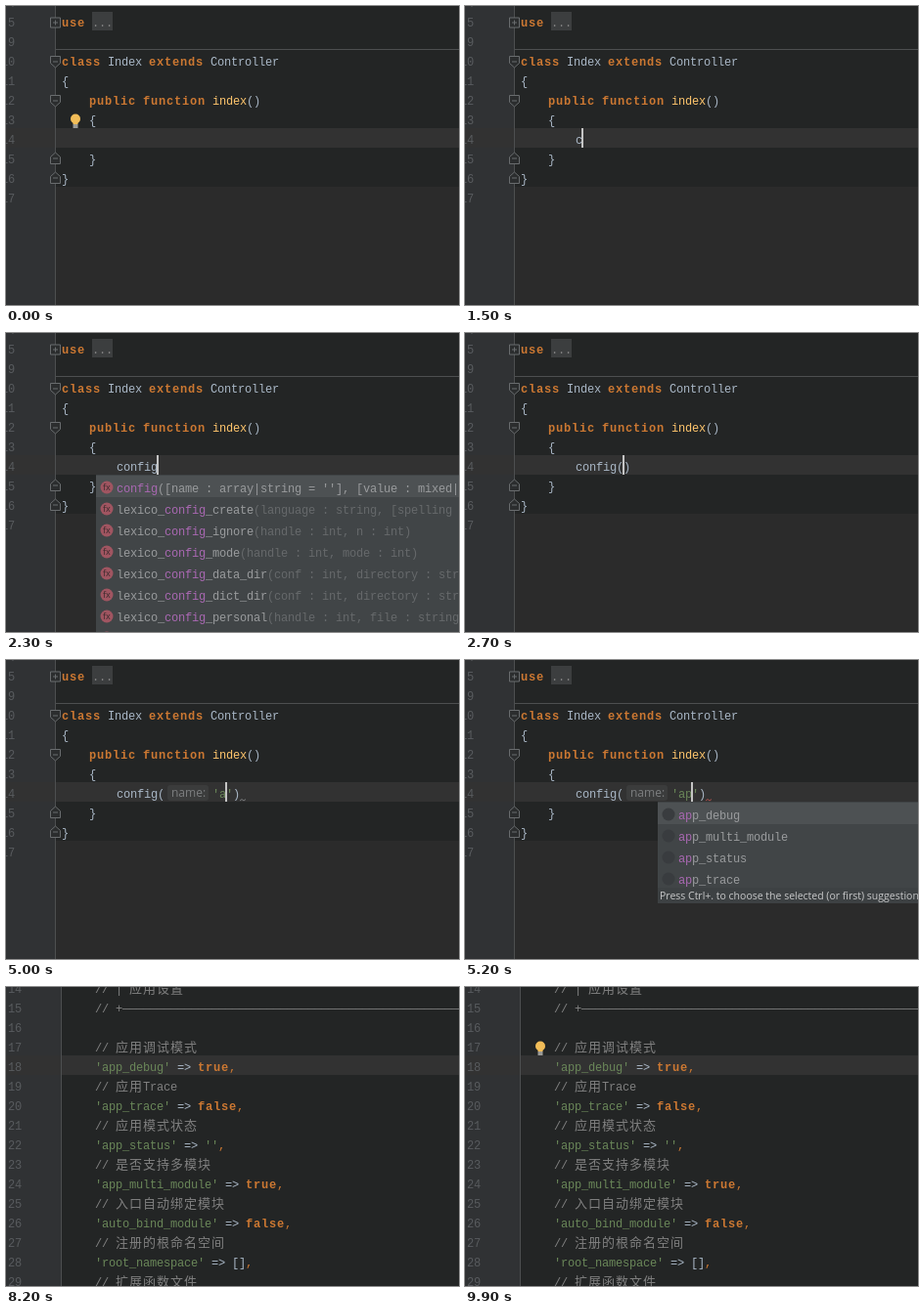
An HTML page with a canvas that plays this animation: 463 by 306 pixels, repeating every 10 s.

```html
<!DOCTYPE html>
<html lang="en">
<head>
<meta charset="utf-8">
<title>Editor autocomplete</title>
<style>
html, body { margin: 0; width: 100%; height: 100%; overflow: hidden; background: #2b2b2b; }
canvas { display: block; }
</style>
</head>
<body>
<canvas id="stage" width="463" height="306"></canvas>
<script>
const c = document.getElementById('stage').getContext('2d');
const W = 463, H = 306, LOOP = 10000;

const MONO = '12px "Liberation Mono", "DejaVu Sans Mono", monospace';
const CJK = '13px "Noto Sans CJK SC", "Noto Sans CJK", sans-serif';
const UI = '"Open Sans", "Noto Sans", sans-serif';
const PLAIN = '#a9b7c6', ORANGE = '#cc7832', GREEN = '#6a8759', GREY = '#808080';

// style: colour, font, advance per character, letter spacing
const mono = color => [color, MONO, 7, '-0.2px'];
const STYLES = {
  t: mono(PLAIN), f: mono('#ffc66d'), s: mono(GREEN), o: mono(ORANGE), g: mono(GREY),
  n: mono('#585b5e'), p: mono('#a968b2'), l: mono('#999b9d'), d: mono('#66696b'),
  k: [ORANGE, 'bold ' + MONO, 8, '0.8px'],
  z: [GREY, CJK, 14, '1px']
};

function rect(x, y, w, h, color) {
  c.fillStyle = color;
  c.fillRect(x, y, w, h);
}

function disc(x, y, r, color) {
  c.fillStyle = color;
  c.beginPath();
  c.arc(x, y, r, 0, 7);
  c.fill();
}

// Writes [style, text] runs on the character grid and returns the end x.
function write(x, y, ...runs) {
  for (const [style, text] of runs) {
    const [color, font, step, spacing] = STYLES[style];
    c.fillStyle = color;
    c.font = font;
    c.letterSpacing = spacing;
    c.fillText(text, x, y);
    x += text.length * step;
  }
  return x;
}

function label(text, x, y, size, color) {
  c.letterSpacing = '0px';
  c.font = size + 'px ' + UI;
  c.fillStyle = color;
  c.fillText(text, x, y);
}

function lineNumber(n, right, y) {
  write(right - 7 * String(n).length, y, ['n', String(n)]);
}

function bulb(x, y) {
  disc(x, y + 5.5, 5, '#f2bd58');
  rect(x - 2.5, y + 9, 5, 2, '#f2bd58');
  rect(x - 2.5, y + 11, 5, 4, '#9a9a96');
}

function caret(x, y) {
  rect(x - 1, y, 2, 20, '#c4c4c4');
}

function squiggle(x, color) {
  c.strokeStyle = color;
  c.beginPath();
  c.moveTo(x, 144);
  for (let i = 1; i < 4; i++) c.lineTo(x + 2 * i, i % 2 ? 142.5 : 144);
  c.stroke();
}

// Fold marker: dir 1 opens a block, -1 closes it, 0 is collapsed.
function fold(y, dir) {
  c.strokeStyle = '#696c6e';
  c.fillStyle = '#2b2d2e';
  c.beginPath();
  if (dir) {
    const a = y - 5.5 * dir, b = y + 1.5 * dir;
    c.moveTo(45.5, a);
    c.lineTo(55.5, a);
    c.lineTo(55.5, b);
    c.lineTo(50.5, y + 6 * dir);
    c.lineTo(45.5, b);
    c.closePath();
  } else c.rect(45.5, y - 5, 10, 10);
  c.fill();
  c.moveTo(48, y);
  c.lineTo(53, y);
  if (!dir) {
    c.moveTo(50.5, y - 2.5);
    c.lineTo(50.5, y + 2.5);
  }
  c.stroke();
}

function gutter(width, rowY) {
  rect(0, 0, width, H, '#303234');
  rect(0, rowY, W, 20, '#323232');
  rect(width, 0, 1, H, '#4d4f50');
}

function popup(x, rows, match, icon) {
  const top = 146, end = top + 22 * rows.length;
  rect(x, top - 1, W - x, end + 16 - top, '#414547');
  rect(x, top, W - x, 22, '#4d5153');
  rows.forEach(([name, args = ''], i) => {
    const y = 158 + 22 * i, at = name.indexOf(match), stop = at + match.length;
    icon(x + 11, y);
    write(x + 21, y + 5, ['l', name.slice(0, at)], ['p', match],
      ['l', name.slice(stop)], [i ? 'd' : 'l', args]);
  });
  rect(x, end - 1, W - x, 16, '#3d4143');
  label('Press Ctrl+. to choose the selected (or first) suggestion and insert a dot afterwards',
    x + 2, end + 11, 10.5, '#c8c9ca');
}

function functionIcon(x, y) {
  disc(x, y, 6.5, '#a05561');
  label('fx', x - 4, y + 3, 9, '#3a2a2d');
}

const keyIcon = (x, y) => disc(x, y, 6.5, '#393c3f');

const FUNCTIONS = [
  ['config', "([name : array|string = ''], [value : mixed|null"],
  ['confirm_sql_row_compiled', '()'],
  ['lexico_config_create', '(language : string, [spelling : string'],
  ['lexico_config_ignore', '(handle : int, n : int)'],
  ['lexico_config_mode', '(handle : int, mode : int)'],
  ['lexico_config_data_dir', '(conf : int, directory : string)'],
  ['lexico_config_dict_dir', '(conf : int, directory : string)'],
  ['lexico_config_personal', '(handle : int, file : string)'],
  ['lexico_config_repl', '(handle : int, file : string)']
];
const KEYS = ['app_debug', 'app_multi_module', 'app_status', 'app_trace', 'auto_bind_module',
  'action_suffix', 'auto_search', 'auto_start'].map(k => [k]);

const CALL = [[0, ''], [1500, 'c'], [1700, 'con'], [1900, 'conf'], [2100, 'confi'], [2300, 'config']];
const KEY = [[3600, ''], [4900, 'a'], [5200, 'ap'], [5800, 'app_debug']];
const latest = (steps, t) => steps.filter(s => s[0] <= t).pop()[1];
const within = (t, a, b) => t >= a && t < b;

function controller(t) {
  rect(0, 0, W, H, '#2b2b2b');
  rect(51, 0, W, 185, '#232525');
  gutter(50, 125);
  rect(51, 44, W, 1, '#4d4f50');
  [4, 5, 9, 10, 11, 12, 13, 14, 15, 16, 17].forEach((n, i) => lineNumber(n, 9, 1 + 20 * i));
  fold(17, 0);
  fold(57, 1);
  fold(97, 1);
  fold(156, -1);
  fold(176, -1);

  rect(88, 6, 21, 19, '#3c3e3f');
  write(57, 21, ['k', 'use'], ['t', ' '], ['g', '...']);
  write(57, 61, ['k', 'class'], ['t', ' Index '], ['k', 'extends'], ['t', ' Controller']);
  write(57, 81, ['t', '{']);
  write(85, 101, ['k', 'public'], ['t', ' '], ['k', 'function'], ['t', ' '], ['f', 'index'], ['t', '()']);
  write(85, 121, ['t', '{']);
  write(85, 161, ['t', '}']);
  write(57, 181, ['t', '}']);
  statement(t);

  if (t < 700) bulb(71, 110);
  if (within(t, 3500, 3600) || within(t, 4500, 4900)) bulb(71, 125);
}

function statement(t) {
  const call = latest(CALL, t);
  let x = write(113, 141, ['t', call]), cursor = x;
  if (t >= 2700) {
    x = write(x, 141, ['t', '(']);
    cursor = x;
    if (t >= 3900) {
      c.fillStyle = '#3b3c3c';
      c.beginPath();
      c.roundRect(165, 128, 42, 16, 3);
      c.fill();
      label('name:', 169, 140, 12, '#7d7f80');
      x = 211;
    }
    if (t >= 3600) {
      const key = latest(KEY, t);
      cursor = x + 7 * (key.length + 1) - (t >= 6700 ? 7 : 0);
      x = write(x, 141, ['s', `'${key}'`]);
    }
    x = write(x, 141, ['t', ')']);
    if (t >= 3000 && !within(t, 4900, 5000) && !within(t, 5800, 6000))
      squiggle(x, within(t, 5200, 5800) ? '#a8504c' : '#77797a');
  }
  if (t >= 700 && !within(t, 6500, 6700)) caret(cursor, 125);

  if (within(t, 1900, 2700))
    popup(92, t < 2000 ? FUNCTIONS.slice(0, 3) : FUNCTIONS.filter(f => f[0].includes(call)), call, functionIcon);
  if (within(t, 5100, 5800)) {
    const key = latest(KEY, t);
    popup(197, KEYS.filter(k => k[0].startsWith(key)), key, keyIcon);
  }
}

const note = (text, tail = '') => [['g', '// '], ['z', text], ['g', tail]];
const entry = (key, ...value) => [['s', `'${key}'`], ['t', ' => '], ...value, ['o', ',']];
const SETTINGS = [
  [['g', '// | '], ['z', '应用设置']],
  [['g', '// +' + '─'.repeat(60)]],
  [],
  note('应用调试模式'),
  entry('app_debug', ['k', 'true']),
  note('应用', 'Trace'),
  entry('app_trace', ['k', 'false']),
  note('应用模式状态'),
  entry('app_status', ['s', "''"]),
  note('是否支持多模块'),
  entry('app_multi_module', ['k', 'true']),
  note('入口自动绑定模块'),
  entry('auto_bind_module', ['k', 'false']),
  note('注册的根命名空间'),
  entry('root_namespace', ['t', '[]']),
  note('扩展函数文件')
];

function settings(t) {
  rect(0, 0, W, H, '#232525');
  gutter(56, 70);
  SETTINGS.forEach((runs, i) => {
    const y = 6 + 20 * i;
    lineNumber(14 + i, 16, y);
    write(91, y, ...runs);
  });
  if (within(t, 7400, 8200) || within(t, 8700, 9200) || within(t, 9600, 9900)) caret(91, 70);
  if (t >= 8300) bulb(77, 55);
}

function frame(now) {
  const t = now % LOOP;
  c.lineWidth = 1;
  (t < 7300 ? controller : settings)(t);
  requestAnimationFrame(() => frame(performance.now() - start));
}

const start = performance.now();
frame(0);
</script>
</body>
</html>
```
